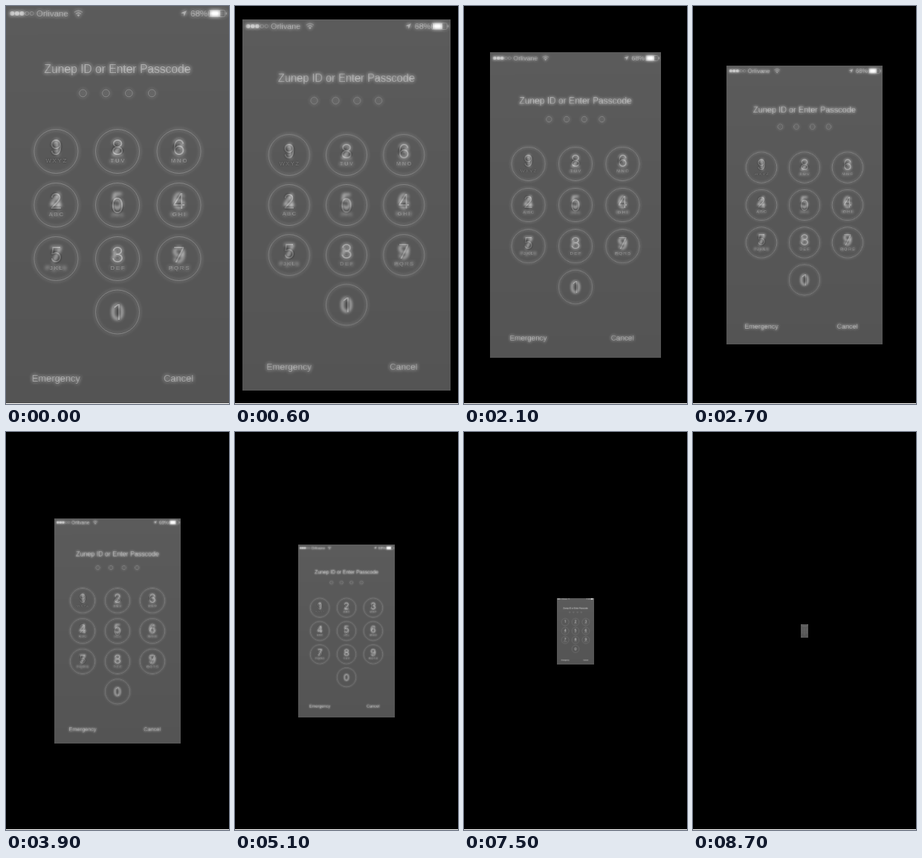
Recreate the animation shown at these times as an HTML page with a canvas. Size 300x534 px, loop 9 s.

```html
<!DOCTYPE html>
<html lang="en">
<head>
<meta charset="utf-8">
<title>Hybrid keypad</title>
<style>
html, body { margin: 0; width: 100%; height: 100%; overflow: hidden; background: #000; }
canvas { display: block; width: 100vw; height: 100vh; }
</style>
</head>
<body>
<canvas id="stage" width="300" height="534"></canvas>
<script>
const W = 300, H = 534, STEPS = 30, STEP_MS = 300;
const SANS = '"Liberation Sans", Arial, sans-serif';
const LETTERS = ['', '', 'ABC', 'DEF', 'GHI', 'JKL', 'MNO', 'PQRS', 'TUV', 'WXYZ'];
const NEAR = '9862045371', FAR = '1234567890';

function layer() {
  const canvas = document.createElement('canvas');
  canvas.width = W;
  canvas.height = H;
  return canvas.getContext('2d', { willReadFrequently: true });
}

function ring(c, x, y, r, filled) {
  c.beginPath();
  c.arc(x, y, r, 0, 2 * Math.PI);
  filled ? c.fill() : c.stroke();
}

function text(c, str, x, y, size, align = 'center', font = SANS, weight = 400) {
  c.font = `${weight} ${size}px ${font}`;
  c.textAlign = align;
  c.fillText(str, x, y);
}

function drawStatus(c) {
  for (let i = 0; i < 5; i++) ring(c, 8.5 + i * 6.6, 10, i < 3 ? 2.9 : 2.5, i < 3);
  text(c, 'Orlivane', 41, 14, 11.5, 'left');
  text(c, '68%', 271, 14, 11.5, 'right');

  // wireless fan
  c.lineWidth = 1.5;
  for (const r of [4.8, 7.8]) {
    c.beginPath();
    c.arc(97.5, 14, r, -Math.PI * 0.75, -Math.PI * 0.25);
    c.stroke();
  }
  c.beginPath();
  c.moveTo(97.5, 14.5);
  c.arc(97.5, 14, 2.6, -Math.PI * 0.75, -Math.PI * 0.25);
  c.fill();

  c.fill(new Path2D('M243 6L239.5 14L238.8 10.3L235 9.6Z'));

  c.lineWidth = 1;
  c.beginPath();
  c.roundRect(272.5, 5.5, 22, 9, 2);
  c.stroke();
  c.fillRect(274, 6, 14, 8);
  c.fillRect(295.5, 8.5, 1.5, 3);
}

function drawKeys(c, order) {
  [...order].forEach((digit, i) => {
    const last = i === 9;
    const x = last ? 150 : 67.5 + (i % 3) * 82.5;
    const y = 195 + Math.floor(i / 3) * 72 - (last ? 0.5 : 0);
    const centred = last || digit === '0';
    ring(c, x, y, 29.5);
    text(c, digit, x, y + (centred ? 10.5 : 5), 29, 'center', 'Inter, Roboto, sans-serif', 300);
    c.letterSpacing = '2px';
    text(c, LETTERS[digit], x + 1, y + 15, 7.5);
    c.letterSpacing = '0px';
  });
}

function drawScreen(order) {
  const c = layer();
  c.fillStyle = '#fff';
  c.strokeStyle = 'rgba(255, 255, 255, 0.65)';
  c.lineWidth = 1;
  drawStatus(c);
  text(c, 'Zunep ID or Enter Passcode', 150, 90, 15.6);
  for (let i = 0; i < 4; i++) ring(c, 103.5 + i * 30.9, 117, 4.8);
  drawKeys(c, order);
  text(c, 'Emergency', 35, 504, 12.85, 'left');
  text(c, 'Cancel', 252, 504, 12.85, 'right');
  return c;
}

function blurred(source, radius) {
  const c = layer();
  c.filter = `blur(${radius}px)`;
  c.drawImage(source.canvas, 0, 0);
  return c;
}

const alpha = c => c.getImageData(0, 0, W, H).data;

// Soft far layout plus the fine edges of the near layout.
function buildHybrid() {
  const near = drawScreen(NEAR);
  const sharp = alpha(near);
  const soft = alpha(blurred(near, 1));
  const glow = alpha(blurred(drawScreen(FAR), 2));
  const out = layer();
  const image = out.createImageData(W, H);
  const px = image.data;
  for (let i = 0; i < px.length; i += 4) {
    const base = 91 - 7 * i / px.length;
    const v = base + glow[i + 3] * 0.68 + (sharp[i + 3] - soft[i + 3]) * 0.24;
    px[i] = px[i + 1] = px[i + 2] = v;
    px[i + 3] = 255;
  }
  out.putImageData(image, 0, 0);
  return out.canvas;
}

const hybrid = buildHybrid();
const stage = document.getElementById('stage').getContext('2d');
stage.imageSmoothingQuality = 'high';
const start = performance.now();
let shown = -1;

function draw(step) {
  const scale = 1 - step / STEPS;
  const w = W * scale + 0.6, h = H * scale;
  stage.fillStyle = '#000';
  stage.fillRect(0, 0, W, H);
  stage.drawImage(hybrid, (W - w) / 2, (H - h) / 2, w, h);
  stage.fillStyle = '#fff';
  stage.fillRect(0, H - 1, W, 1);
}

function tick(now) {
  const step = Math.floor(Math.max(0, now - start) / STEP_MS) % STEPS;
  if (step !== shown) draw(shown = step);
  requestAnimationFrame(tick);
}

draw(shown = 0);
requestAnimationFrame(tick);
</script>
</body>
</html>
```
